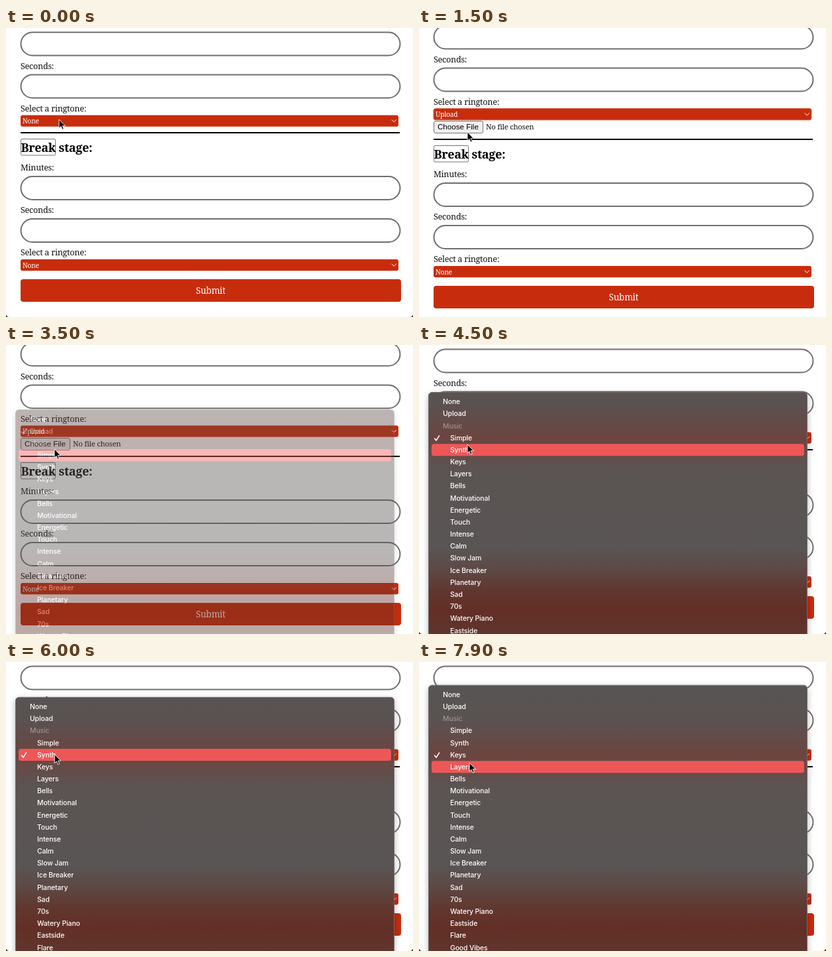
These frames come from a looping animation (614x436 px, 8 s). An HTML page:

```html
<!DOCTYPE html>
<html lang="en">
<head>
<meta charset="utf-8">
<title>Timer settings</title>
<style>
  html, body { margin: 0; width: 100%; height: 100%; overflow: hidden; background: #fff; }
  svg { display: block; width: 614px; height: 436px; }
  text { white-space: pre; }
  .label, .heading, .option, .submit, .file { font-family: "Noto Serif", serif; letter-spacing: -.02em; }
  .label { font-size: 12.6px; fill: #111; }
  .heading { font-size: 18px; font-weight: 700; }
  .option { font-size: 10.2px; fill: #fff; }
  .submit { font-size: 13.5px; fill: #fff; text-anchor: middle; }
  .file { font-size: 11.2px; fill: #111; }
  .button { font: 11.6px "Liberation Sans", Arial, sans-serif; }
  .field { fill: #fff; stroke: #6e6e6e; stroke-width: 2; }
  .red { fill: #c72d0d; }
  .line { fill: none; stroke: #fff; stroke-linecap: round; stroke-linejoin: round; }
  .item { font: 500 10.4px Inter, sans-serif; letter-spacing: -.1px; fill: #fff; }
  .muted { fill: #fff; fill-opacity: .38; }
  #menu { filter: drop-shadow(0 3px 5px rgba(0, 0, 0, .3)); }
</style>
</head>
<body>
<svg id="stage" viewBox="0 0 614 436" xmlns="http://www.w3.org/2000/svg">
  <defs>
    <linearGradient id="glass" gradientUnits="userSpaceOnUse" x1="0" y1="0" x2="0" y2="436">
      <stop offset=".1" stop-color="#575453"/>
      <stop offset=".2" stop-color="#5a5251"/>
      <stop offset=".32" stop-color="#6c4540"/>
      <stop offset=".43" stop-color="#5b5453"/>
      <stop offset=".7" stop-color="#595554"/>
      <stop offset=".77" stop-color="#5d4a47"/>
      <stop offset=".85" stop-color="#61372f"/>
      <stop offset=".92" stop-color="#632f26"/>
      <stop offset="1" stop-color="#5f352e"/>
    </linearGradient>
  </defs>
  <g id="upper"></g>
  <g id="upload">
    <rect x="22.5" y="140.5" width="74" height="18" rx="2.5" fill="#efefef" stroke="#767676"/>
    <text class="button" x="28" y="153.3">Choose File</text>
    <text class="file" x="101" y="153.3">No file chosen</text>
  </g>
  <g id="lower"></g>
  <path id="corners" d="M0 432.5Q.8 435.2 4 436H0ZM614 432.5Q613.2 435.2 610 436H614Z" fill="#222"/>
  <g id="menu">
    <rect id="panel" x="14.5" width="571" height="460" rx="5" fill="url(#glass)" stroke="#6f6a69"/>
    <rect id="highlight" x="19" width="562" height="18" rx="3.5" fill="#ef5757"/>
    <g id="items"></g>
    <path class="line" stroke-width="1.5" d="M23.5 141L26 144L30.5 136.8"/>
  </g>
  <path id="cursor" d="M0 0V13.2L3 10.4L5 15.2L7.2 14.2L5.2 9.6H9.4Z" stroke="#fff" stroke-width=".9"/>
</svg>
<script>
const DURATION = 8000, STEP = 100, ROW = 18.17, SELECT_Y = 140;
const names = ["None", "Upload", "Music", "Simple", "Synth", "Keys", "Layers", "Bells",
  "Motivational", "Energetic", "Touch", "Intense", "Calm", "Slow Jam", "Ice Breaker",
  "Planetary", "Sad", "70s", "Watery Piano", "Eastside", "Flare", "Good Vibes"];

// time, selected item, highlighted item (-1: none), menu opacity
const states = [
  [0, 0, 0, 0], [100, 0, 0, 1], [600, 0, 1, 1], [1300, 0, -1, 1], [1400, 0, 1, .45],
  [1500, 1, 1, 0], [2400, 1, 1, 1], [2600, 1, -1, 1], [2800, 1, 3, 1], [3400, 1, -1, 1], [3500, 1, 3, .42],
  [3600, 3, 3, 0], [4100, 3, 3, 1], [4400, 3, 4, 1], [4900, 3, -1, 1], [5000, 3, 4, .45],
  [5100, 4, 4, 0], [5800, 4, 4, 1], [6200, 4, 5, 1], [6500, 4, -1, 1], [6600, 4, 5, .6], [6700, 4, 5, .15],
  [6800, 5, 5, 0], [7200, 5, 5, 1], [7500, 5, 6, 1], [7800, 5, -1, 1], [7900, 5, 6, 1]
];
// time, x, y
const path = [
  [0, 80, 138], [500, 80, 138], [700, 76, 152], [1300, 76, 152], [1500, 73, 157], [1600, 73, 157],
  [2100, 66, 128], [2400, 67, 128], [3000, 73, 157], [3500, 73, 157], [3900, 72, 134],
  [4100, 72, 134], [4500, 73, 150], [5100, 72, 150], [5500, 72, 135], [5800, 72, 135],
  [6400, 77, 152], [6600, 77, 152], [7000, 77, 136], [7200, 77, 136], [7600, 76, 152], [8000, 76, 152]
];

const $ = id => document.getElementById(id);
const text = (cls, x, y, value) => `<text class="${cls}" x="${x}" y="${y}">${value}</text>`;
const field = y => `<rect class="field" x="22.5" y="${y}" width="572" height="35" rx="17.5"/>`;
const select = (y, id) => `<rect id="${id}" class="red" x="22" y="${y - 8.5}" width="570" height="17.3" rx="3"/>
  <path class="line" d="M582 ${y - 1.5}L585.3 ${y + 1.8}L588.6 ${y - 1.5}"/>
  <text id="${id}-value" class="option" x="25" y="${y + 4}">None</text>`;

$("upper").innerHTML = field(6.5) + text("label", 22, 61.5, "Seconds:") + field(70.5)
  + text("label", 22, 125.5, "Select a ringtone:") + select(SELECT_Y, "work");
$("lower").innerHTML = `<rect x="22" y="157" width="572" height="2"/>
  <rect x="22.5" y="167.5" width="52" height="24.5" rx="1.5" fill="none" stroke="#777"/>`
  + text("heading", 22.5, 186.5, "Break") + text("heading", 79.5, 186.5, "stage:")
  + text("label", 22, 215, "Minutes:") + field(224)
  + text("label", 22, 279, "Seconds:") + field(288)
  + text("label", 22, 343, "Select a ringtone:") + select(357.5, "rest")
  + `<rect class="red" x="22" y="379" width="574" height="34" rx="4"/>`
  + text("submit", 308.7, 401.3, "Submit");
$("items").innerHTML = names.map((name, i) =>
  text(i === 2 ? "item muted" : "item", i < 3 ? 36 : 47, SELECT_Y + 3.8 + i * ROW, name)).join("");

const move = (el, x, y) => el.setAttribute("transform", `translate(${x} ${y})`);

function cursorAt(t) {
  const i = path.findIndex(point => point[0] > t);
  const [t0, x0, y0] = path[i - 1], [t1, x1, y1] = path[i];
  const p = (t - t0) / (t1 - t0), eased = p * p * (3 - 2 * p);
  return [x0 + (x1 - x0) * eased, y0 + (y1 - y0) * eased];
}

function draw(t) {
  const [, selected, active, opacity] = states.filter(state => state[0] <= t).pop();
  const uploading = selected === 1, shift = uploading ? 10 : 0;
  move($("upper"), 0, -shift);
  move($("lower"), 0, shift);
  $("upload").style.display = uploading ? "" : "none";
  $("corners").style.display = uploading ? "none" : "";
  $("work-value").textContent = names[selected];
  $("work").style.stroke = t >= 1500 && !opacity ? "#d9583d" : "none";

  const menu = $("menu");
  menu.style.display = opacity ? "" : "none";
  menu.style.opacity = opacity;
  const top = SELECT_Y - shift - selected * ROW;
  $("panel").setAttribute("y", top - 14);
  $("highlight").setAttribute("y", top + active * ROW - 9);
  $("highlight").style.display = active < 0 ? "none" : "";
  move($("items"), 0, top - SELECT_Y);
  move(menu.lastElementChild, 0, -shift);
  move($("cursor"), ...cursorAt(t));
}

const start = performance.now();
function tick() {
  const t = (performance.now() - start) % DURATION;
  draw(Math.floor(t / STEP) * STEP);
  requestAnimationFrame(tick);
}
tick();
</script>
</body>
</html>
```
